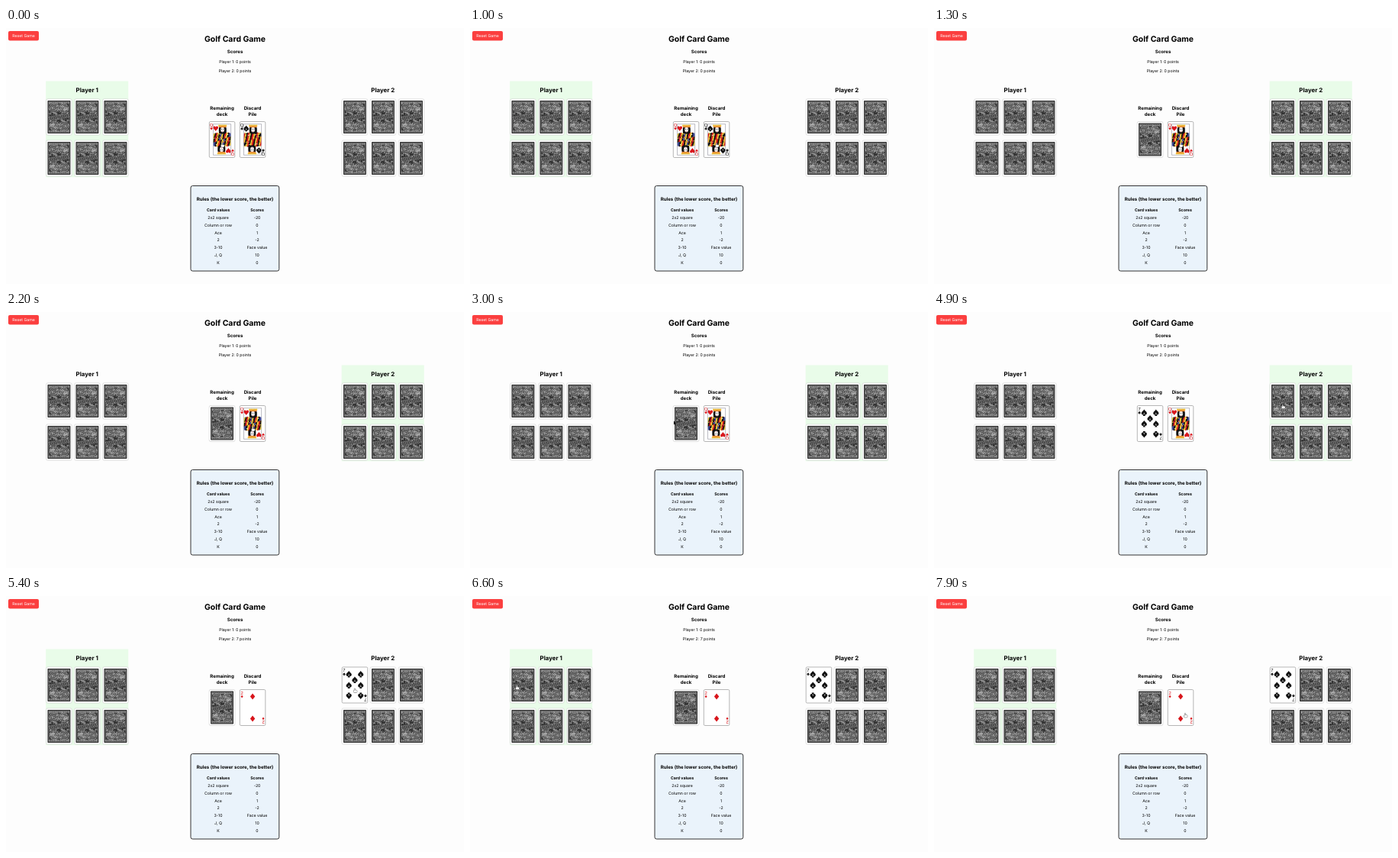
Recreate the animation shown at these times as an HTML page with a canvas. Size 600 by 335 pixels, loop 8 s.

```html
<!DOCTYPE html>
<html lang="en">
<head>
<meta charset="utf-8">
<title>Golf Card Game</title>
<style>
  html, body { margin: 0; width: 100%; height: 100%; overflow: hidden; background: #fdfdfd; }
  canvas { display: block; }
</style>
</head>
<body>
<canvas width="600" height="335"></canvas>
<script>
const ctx = document.querySelector('canvas').getContext('2d');
const LOOP = 8000, ZOOM = 1 / 3.07, W = 33.5, H = 47, TAU = 2 * Math.PI;
const RED = '#d8161c', GOLD = '#f0cc3c', BLUE = '#3c4a9c', INK = '#111';

function seeded(seed) {
  return () => (seed = seed * 16807 % 2147483647) / 2147483647;
}

function outline(steps, point) {
  const path = new Path2D();
  for (let i = 0; i < steps; i++) path.lineTo(...point(i / steps * TAU));
  path.closePath();
  return path;
}

const heartAt = a => [Math.sin(a) ** 3 * 0.9,
  (5 * Math.cos(2 * a) + 2 * Math.cos(3 * a) + Math.cos(4 * a) - 13 * Math.cos(a)) / 16];
const SUITS = {
  heart: outline(40, heartAt),
  diamond: outline(4, a => [Math.cos(a) * 0.8, Math.sin(a)]),
  spade: outline(40, a => [heartAt(a)[0], -heartAt(a)[1]])
};
SUITS.spade.addPath(new Path2D('M0 0L.4 1.1H-.4Z'));

// Text sizes are CSS pixels of the full-size page, shrunk by ZOOM.
function text(str, x, y, size = 16, weight = 400, color = '#000', family = 'Inter, sans-serif') {
  ctx.save();
  ctx.translate(x, y);
  ctx.scale(ZOOM, ZOOM);
  ctx.font = `${weight} ${size}px ${family}`;
  ctx.textAlign = 'center';
  ctx.textRendering = 'geometricPrecision';
  ctx.fillStyle = color;
  ctx.fillText(str, 0, 0);
  ctx.restore();
}
const heading = (str, x, y, size = 18.72) => text(str, x, y, size, 700);

function box(x, y, w, h, r, fill, stroke, line = 1) {
  ctx.beginPath();
  ctx.roundRect(x, y, w, h, r);
  ctx.fillStyle = fill;
  ctx.fill();
  if (!stroke) return;
  ctx.strokeStyle = stroke;
  ctx.lineWidth = line;
  ctx.stroke();
}

function disc(x, y, r, color) {
  box(x - r, y - r, 2 * r, 2 * r, r, color);
}

function pip(suit, x, y, size, flip) {
  ctx.save();
  ctx.translate(x, y);
  ctx.scale(size, flip ? -size : size);
  ctx.fillStyle = suit === 'spade' ? INK : RED;
  ctx.fill(SUITS[suit]);
  ctx.restore();
}

// Draws the same half twice, the second time turned by 180 degrees.
function bothWays(draw) {
  for (const turn of [0, Math.PI]) {
    ctx.save();
    ctx.translate(W / 2, H / 2);
    ctx.rotate(turn);
    ctx.translate(-W / 2, -H / 2);
    draw();
    ctx.restore();
  }
}

// Half of the card back: two rosettes, a slanted band and random leaves.
function makeOrnament() {
  const path = new Path2D(), random = seeded(11);
  const arc = (x, y, r, from = 0, sweep = TAU) => {
    path.moveTo(x + r * Math.cos(from), y + r * Math.sin(from));
    path.arc(x, y, r, from, from + sweep);
  };
  for (const x of [10, 23]) {
    for (let r = 1; r < 6; r += 1.6) arc(x, 12, r);
  }
  for (let x = 5; x < 29; x += 2.4) {
    arc(x, 5, 0.8);
    arc(x, 25 - x * 0.2, 1.2, 1, 4);
  }
  for (let i = 0; i < 45; i++) {
    arc(4.5 + random() * 24, 5 + random() * 17, 0.6 + random(), random() * TAU, 3);
  }
  return path;
}
const ORNAMENT = makeOrnament();

function drawBack() {
  box(0, 0, W, H, 1.5, '#fff', '#cfcfcf', 0.6);
  box(1.8, 2, W - 3.6, H - 4, 0.8, '#2a2a2a');
  box(3.2, 3.4, W - 6.4, H - 6.8, 0, '#333', '#aaa', 0.5);
  ctx.strokeStyle = '#c8c8c8';
  ctx.lineWidth = 0.6;
  bothWays(() => ctx.stroke(ORNAMENT));
}

function queenHalf(suit) {
  const random = seeded(suit === 'heart' ? 5 : 8);
  const colors = suit === 'heart' ? [GOLD, INK, RED, GOLD, INK, BLUE] : [RED, GOLD, INK, RED, GOLD, INK];
  ctx.beginPath();
  ctx.moveTo(5.4, 3.4);
  ctx.lineTo(28.1, 3.4);
  ctx.lineTo(28.1, 19.5);
  ctx.lineTo(5.4, 27.5);
  ctx.clip();
  // Robe: slanted stripes below a curved shoulder line.
  for (let i = 0; i < 12; i++) {
    const x = 5.4 + i * 1.9, top = 13 + Math.abs(i - 6) * 0.4;
    ctx.beginPath();
    ctx.moveTo(x, top);
    ctx.lineTo(x + 2, top);
    ctx.lineTo(x + 4, 29);
    ctx.lineTo(x - 3, 29);
    ctx.fillStyle = colors[i % colors.length];
    ctx.fill();
  }
  for (let i = 0; i < 40; i++) {
    disc(6 + random() * 22, 14 + random() * 12, 0.35 + random() * 0.4, [GOLD, '#fff', INK, RED][i % 4]);
  }
  box(12.5, 6, 10, 10, 3.5, INK);
  box(14.8, 7, 5, 7, 2.4, '#fff', INK, 0.35);
  for (const x of [16.2, 18.5]) disc(x, 10, 0.5, INK);
  disc(17.4, 12.4, 0.5, RED);
  for (let x = 13; x < 23; x += 2.2) disc(x, 5.2, 1.3, GOLD);
  box(13, 5.8, 9, 1.6, 0.5, GOLD, RED, 0.4);
  pip(suit, 8.4, 8.7, 3.7);
}

function drawFace(rank, suit) {
  box(0, 0, W, H, 1.5, '#fff', '#999', 0.7);
  if (rank === 'Q') {
    box(5.2, 3.2, W - 10.4, H - 6.4, 0, '#fff', '#556', 0.4);
    bothWays(() => queenHalf(suit));
  } else {
    const columns = rank === '7' ? [9, W - 9] : [W / 2];
    const rows = rank === '7' ? [9, H / 2, H - 9] : [9, H - 9];
    for (const x of columns) for (const y of rows) pip(suit, x, y, 4, y === H - 9);
    if (rank === '7') pip(suit, W / 2, 16.5, 4);
  }
  bothWays(() => {
    text(rank, 2.8, 6.3, 18, 400, suit === 'spade' ? INK : RED, 'Liberation Sans, Arial, sans-serif');
    pip(suit, 2.8, 9.1, 1.8);
  });
}

function card({ x, y }, face) {
  ctx.save();
  ctx.translate(x, y);
  face ? drawFace(...face) : drawBack();
  ctx.restore();
}

const HANDS = [52.7, 440.2].map(left =>
  Array.from({ length: 6 }, (_, i) => ({ x: left + i % 3 * 37, y: i < 3 ? 93 : 147 })));
const DECK = { x: 266.3, y: 122.5 }, DISCARD = { x: 306.3, y: 122.5 };
const SLOTS = [DECK, DISCARD, ...HANDS.flat()];

const QH = ['Q', 'heart'], QS = ['Q', 'spade'], S7 = ['7', 'spade'], D2 = ['2', 'diamond'];
const STATES = [
  { at: 0, active: 0, deck: QH, discard: QS, score: 0 },
  { at: 1300, active: 1, discard: QH, score: 0 },
  { at: 4000, active: 1, deck: S7, discard: QH, score: 0 },
  { at: 5100, active: 0, discard: D2, score: 7, first: S7 }
];
const RULES = [['2x2 square', '-20'], ['Column or row', '0'], ['Ace', '1'], ['2', '-2'],
  ['3-10', 'Face value'], ['J, Q', '10'], ['K', '0']];

// Each move ends over a card; dx shifts it sideways from the aiming point.
const MOVES = [
  { from: 100, to: 700, slot: DISCARD, dx: 0 },
  { from: 2500, to: 3000, slot: DECK, dx: -16 },
  { from: 3000, to: 3400, slot: DECK, dx: 0 },
  { from: 4400, to: 4900, slot: HANDS[1][0], dx: 0 },
  { from: 5400, to: 6600, slot: HANDS[0][0], dx: -8 },
  { from: 7200, to: 7900, slot: DISCARD, dx: 6 }
];

function cursor(t) {
  let x = DECK.x + W / 2, y = DECK.y + 28;
  for (const { from, to, slot, dx } of MOVES) {
    const u = Math.min(1, Math.max(0, (t - from) / (to - from))), ease = u * u * (3 - 2 * u);
    x += (slot.x + W / 2 + dx - x) * ease;
    y += (slot.y + 28 + dx / 2 - y) * ease;
  }
  const overCard = SLOTS.some(s => x > s.x + 2 && x < s.x + W && y > s.y && y < s.y + H);
  ctx.save();
  ctx.translate(x, y);
  if (overCard) {
    box(-1.5, 2.2, 4.4, 3.2, 1, '#fff', '#333', 0.5);
    box(-0.7, -0.2, 1.3, 4, 0.6, '#fff', '#333', 0.4);
    box(-1.2, 2.5, 3.8, 2.5, 0.8, '#fff');
  } else {
    ctx.fillStyle = INK;
    ctx.fill(new Path2D('M0 0V5L1.2 4L2 5.8L2.8 5.4L2 3.7H3.6Z'));
  }
  ctx.restore();
}

function player(index, state) {
  const slots = HANDS[index], left = slots[0].x;
  if (state.active === index) box(left - 0.5, 69.5, 108, 125.7, 0, '#e9fce9');
  heading(`Player ${index + 1}`, left + 53.5, 83.6, 24);
  slots.forEach((slot, i) => card(slot, index === 1 && i === 0 && state.first));
}

function rules() {
  box(242, 206.5, 115.8, 111.5, 2.5, '#eaf3fb', '#333');
  heading('Rules (the lower score, the better)', 300, 225.8);
  heading('Card values', 278, 240.4, 16);
  heading('Scores', 329, 240.4, 16);
  RULES.forEach(([name, value], i) => {
    text(name, 278, 250 + i * 9.75);
    text(value, 329, 250 + i * 9.75);
  });
}

function pile(slot, words, face) {
  words.forEach((word, i) => heading(word, slot.x + W / 2, 107.2 + i * 7.6));
  card(slot, face);
}

function draw(now) {
  const t = now % LOOP, state = STATES.findLast(s => s.at <= t);
  box(0, 0, 600, 335, 0, '#fdfdfd');
  box(3, 4, 40, 12.5, 2, '#fb3f3f');
  text('Reset Game', 23, 12.1, 16, 400, '#fff');
  heading('Golf Card Game', 300, 18, 32);
  heading('Scores', 300, 33.3);
  text('Player 1: 0 points', 300, 46.2);
  text(`Player 2: ${state.score} points`, 300, 58);
  player(0, state);
  player(1, state);
  pile(DECK, ['Remaining', 'deck'], state.deck);
  pile(DISCARD, ['Discard', 'Pile'], state.discard);
  rules();
  cursor(t);
  requestAnimationFrame(draw);
}
requestAnimationFrame(draw);
</script>
</body>
</html>
```
